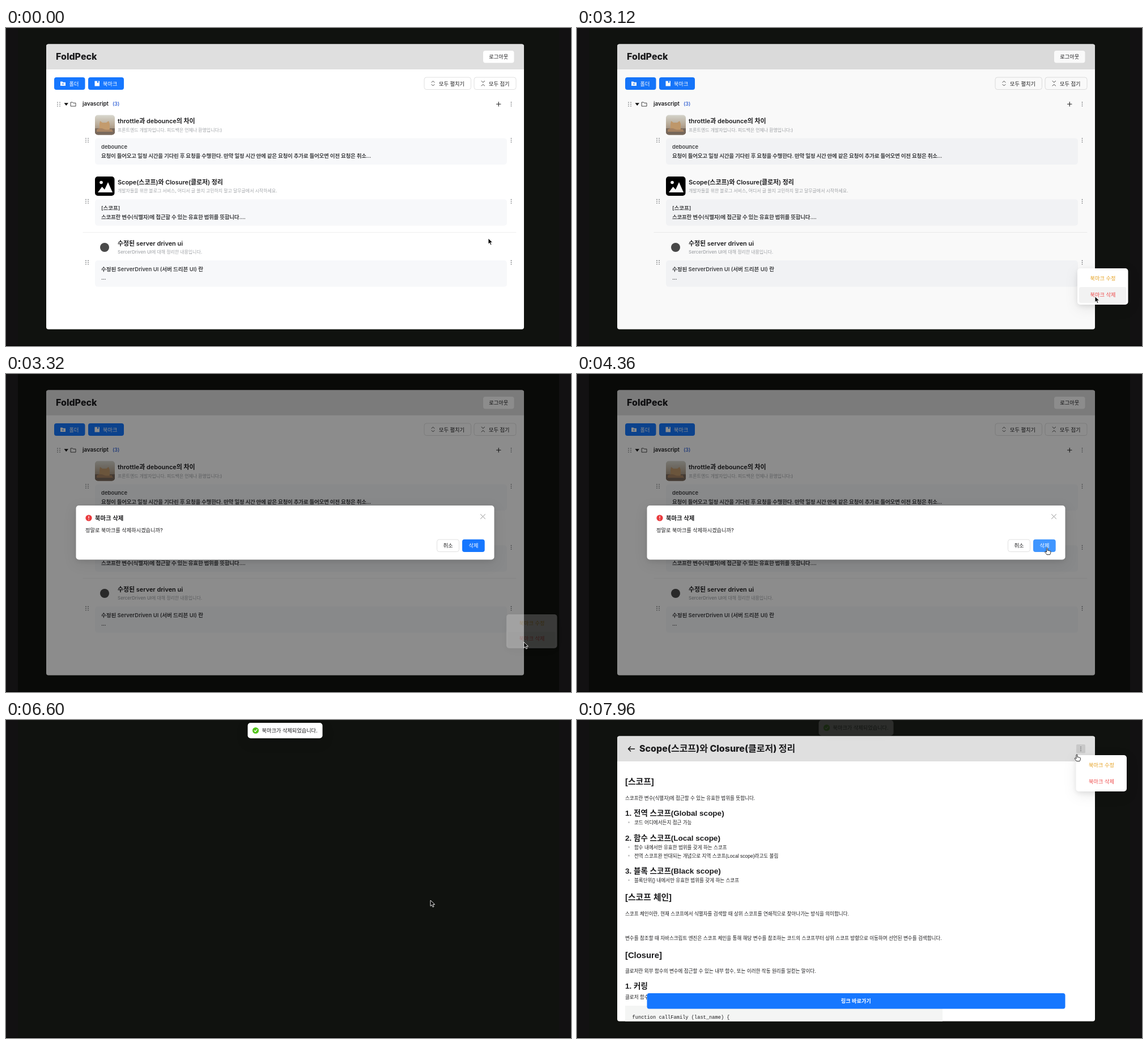
An HTML page for the animation above (8000 ms loop, 997 by 561 pixels).

```html
<!DOCTYPE html>
<html lang="ko">
<head>
<meta charset="utf-8">
<title>Bookmarks</title>
<style>
html, body { margin: 0; width: 100%; height: 100%; overflow: hidden; background: #121112; }
svg { display: block; width: 997px; height: 561px; }
text { font: 400 9.2px Inter, "Noto Sans CJK KR", "Noto Sans CJK", sans-serif; fill: #1c1c1e; white-space: pre; }
.mid { text-anchor: middle; }
.white { fill: #fff; }
.logo { font-size: 16px; font-weight: 800; }
.folder { font-size: 9.7px; font-weight: 600; }
.count { font-size: 8.8px; font-weight: 600; fill: #3a68d8; }
.title { font-size: 10.9px; font-weight: 600; }
.sub { font-size: 7.95px; font-weight: 500; fill: #a3a6aa; }
.note { font-size: 9.5px; font-weight: 600; fill: #3f4043; }
.ko { letter-spacing: -.22px; }
.ask { font-size: 10.4px; font-weight: 600; }
.bold { font-weight: 600; }
.h2, .h3, .p { font-family: "Liberation Sans", "Noto Sans CJK KR", "Noto Sans CJK", sans-serif; }
.h2 { font-size: 14.8px; font-weight: 600; }
.h3 { font-size: 13.5px; font-weight: 600; }
.p { font-size: 8.55px; }
.code { font: 8.7px "Liberation Mono", monospace; }
.edit { fill: #e5a01f; }
.del { fill: #ee4b4b; }
.pop { filter: drop-shadow(0 3px 5px #00000016) drop-shadow(0 6px 11px #00000014); }
</style>
</head>
<body>
<svg id="stage" viewBox="0 0 997 561"></svg>
<script>
const LOOP = 8000;
const rect = (x, y, w, h, fill, r = 0, more = '') =>
  `<rect x="${x}" y="${y}" width="${w}" height="${h}" rx="${r}" fill="${fill}" ${more}/>`;
const text = (x, y, s, cls = '') => `<text x="${x}" y="${y}" class="${cls}">${s}</text>`;
const circle = (x, y, r, fill) => `<circle cx="${x}" cy="${y}" r="${r}" fill="${fill}"/>`;
const line = (d, color = '#222', w = 1) =>
  `<path d="${d}" fill="none" stroke="${color}" stroke-width="${w}" stroke-linecap="round" stroke-linejoin="round"/>`;
const fillPath = (d, fill) => `<path d="${d}" fill="${fill}"/>`;
const group = (id, body, more = '') => `<g id="${id}" ${more}>${body}</g>`;
const dots = (x, y, step = 3.2) => [-step, 0, step].map(d => circle(x, y + d, .8, '#55585c')).join('');
const grip = (x, y) => dots(x - 2, y) + dots(x + 2, y);
const outlined = 'stroke="#d9d9d9" stroke-width=".8"';

const card = rect(71, 28.5, 843, 503, '#fff', 4) +
  fillPath('M71 73V32.5a4 4 0 0 1 4-4H910a4 4 0 0 1 4 4V73z', '#dfdfdf');

const catThumb = rect(157, 153.5, 35, 35, 'url(#photo)', 5) +
  fillPath('M157 177h35v6.500a5 5 0 0 1-5 5h-25a5 5 0 0 1-5-5z', '#79695c') +
  fillPath('M165 181v-12l1-5 4 3h7l4-3 2 5v12q-9 3-18 0z', '#c39b6d') +
  fillPath('M160 179q6-4 12-1t14 0l3 5h-29z', '#a98564');
const pictureThumb = rect(157, 262, 34.5, 34, '#000', 5) +
  circle(168, 272.500, 2.8, '#fff') + fillPath('M162 290l7.500-10 4.500 5 6-13 8 18z', '#fff');

function item(i, thumb, title, sub, first, second) {
  const y = i * 107.8;
  return thumb + text(197, 168.3 + y, title, 'title') + text(197, 182.5 + y, sub, 'sub') +
    rect(157, 194.5 + y, 727, 46.5, '#f7f8fa', 5) +
    text(168, 213.3 + y, first, 'note') + text(168, 228.7 + y, second, 'note ko') +
    grip(143, 198 + y) + dots(891.5, 198 + y);
}

const listPage = card +
  text(88, 56.3, 'FoldPeck', 'logo') +
  rect(842, 40, 54.5, 21.5, '#fff', 4) + text(869.2, 54, '로그아웃', 'mid') +
  rect(85, 87, 54.5, 22, '#1677ff', 4) + text(111.5, 101.5, '폴더', 'white') +
  fillPath('M96 94.500h3.500l1 1.300h4.500v6.200h-9z', '#fff') + line('M100.500 97.300v3M99 98.800h3', '#1677ff', .7) +
  rect(145, 87, 63, 22, '#1677ff', 4) + text(171, 101.5, '북마크', 'white') +
  fillPath('M156.500 93.500h8.500v9h-8.500z', '#fff') + fillPath('M161 93.500h2.200v3.600l-1.100-.8-1.100.8z', '#1677ff') +
  rect(738, 87, 82.500, 21.5, '#fff', 4, outlined) + text(764, 101.5, '모두 펼치기') +
  line('M751 96l2.500-2.500 2.500 2.500M751 99.500l2.500 2.500 2.500-2.500', '#333', .9) +
  rect(826, 87, 74, 21.5, '#fff', 4, outlined) + text(852, 101.5, '모두 접기') +
  line('M839 93.500l2.800 2.500 2.800-2.500M839 102l2.800-2.500 2.800 2.500', '#333', .9) +
  grip(93, 134.5) + fillPath('M102.500 132.300h7.500l-3.750 4.800z', '#111') +
  line('M114.500 131h3l1 1.300h4.500v5.700h-8.500z', '#333', .9) +
  text(135, 137, 'javascript', 'folder') + `<text id="count" x="188" y="137" class="count"></text>` +
  line('M865.500 134.300h7.500M869.250 130.500v7.500', '#222', 1.1) + dots(891.5, 134.3) +
  item(0, catThumb, 'throttle과 debounce의 차이', '프론트엔드 개발자입니다. 피드백은 언제나 환영입니다:)', 'debounce',
    '요청이 들어오고 일정 시간을 기다린 후 요청을 수행한다. 만약 일정 시간 안에 같은 요청이 추가로 들어오면 이전 요청은 취소...') +
  item(1, pictureThumb, 'Scope(스코프)와 Closure(클로저) 정리',
    '개발자들을 위한 블로그 서비스, 어디서 글 쓸지 고민하지 말고 달무글에서 시작하세요.', '[스코프]',
    '스코프란 변수(식별자)에 접근할 수 있는 유효한 범위를 뜻합니다....') +
  group('third', line('M136 360.500H900', '#efefef') + rect(884, 405.5, 15, 16, '#0001', 3, 'id="hover"') +
    item(2, circle(174, 387, 8, '#4a4a4a'), '수정된 server driven ui', 'SercerDriven UI에 대해 정리한 내용입니다.',
      '수정된 ServerDriven UI (서버 드리븐 UI) 란', '...'));

const bullet = (y, s) => circle(91.5, y - 3.8, 1.5, '#c4c4c4') + text(101, y, s, 'p');
const head = (y, s, cls) => text(85, y, s, cls);
const detailPage = card +
  line('M101.500 51H90.500M94.500 47l-4 4 4 4', '#111', 1.5) +
  text(110, 56, 'Scope(스코프)와 Closure(클로저) 정리', 'logo') +
  rect(881, 43, 16, 15.5, '#c9c9c9', 2, 'id="hover2"') + dots(889, 51) +
  head(114, '[스코프]', 'h2') +
  head(141, '스코프란 변수(식별자)에 접근할 수 있는 유효한 범위를 뜻합니다.', 'p') +
  head(169, '1. 전역 스코프(Global scope)', 'h3') + bullet(184.3, '코드 어디에서든지 접근 가능') +
  head(213, '2. 함수 스코프(Local scope)', 'h3') + bullet(228, '함수 내에서만 유효한 범위를 갖게 하는 스코프') +
  bullet(243, '전역 스코프완 반대되는 개념으로 지역 스코프(Local scope)라고도 불림') +
  head(271, '3. 블록 스코프(Black scope)', 'h3') + bullet(286.3, '블록단위{} 내에서만 유효한 범위를 갖게 하는 스코프') +
  head(318, '[스코프 체인]', 'h2') +
  head(345, '스코프 체인이란, 현재 스코프에서 식별자를 검색할 때 상위 스코프를 연쇄적으로 찾아나가는 방식을 의미합니다.', 'p') +
  head(387.5, '변수를 참조할 때 자바스크립트 엔진은 스코프 체인을 통해 해당 변수를 참조하는 코드의 스코프부터 상위 스코프 방향으로 이동하며 선언된 변수를 검색합니다.', 'p') +
  head(419.5, '[Closure]', 'h2') +
  head(446, '클로저란 외부 함수의 변수에 접근할 수 있는 내부 함수, 또는 이러한 작동 원리를 일컫는 말이다.', 'p') +
  head(474, '1. 커링', 'h3') + head(492.3, '클로저 함수', 'p') +
  rect(85, 504, 560, 27.5, '#f4f5f4') + text(97.5, 526.5, 'function callFamily (last_name) {', 'code') +
  rect(123.5, 482, 738, 27.5, '#1677ff', 4) + text(492.3, 498.7, '링크 바로가기', 'mid white bold');

const menu = rect(0, 0, 89.5, 64, '#fff', 5, 'class="pop"') +
  rect(3, 33, 83.5, 28, '#0000000d', 3, 'id="menuHover"') +
  text(45, 20.5, '북마크 수정', 'mid edit') + text(45, 49.5, '북마크 삭제', 'mid del');

const dialog = rect(123.5, 232, 738, 95.5, '#fff', 5, 'class="pop"') +
  circle(146, 254, 5.6, '#e93a3d') + line('M146 251v3.300', '#fff', 1.2) + circle(146, 256.7, .75, '#fff') +
  text(157, 258, '북마크 삭제', 'ask') + text(140, 278.7, '정말로 북마크를 삭제하시겠습니까?') +
  line('M837.500 247.500l8 8M845.500 247.500l-8 8', '#8a8a8a', .9) +
  rect(760.5, 292, 39, 21.5, '#fff', 4, outlined) + text(780, 306, '취소', 'mid') +
  rect(805, 291.7, 39.700, 22.3, '#1677ff', 4, 'id="ok"') + text(825, 306, '삭제', 'mid white');

const toast = rect(426.5, 5, 132, 27.3, '#fff', 5, 'class="pop"') +
  circle(440.5, 18.5, 5.6, '#52c41a') + line('M438 18.600l1.900 1.900 3.200-3.800', '#fff', 1.2) +
  text(451.5, 21.7, '북마크가 삭제되었습니다.');

const arrow = '<path d="M0 0v10.300l2.400-2.200 1.700 3.900 1.900-.8-1.700-3.800h3.400z" fill="#000" stroke="#fff" stroke-width=".9"/>';
const hand = '<path d="M-1 1q1-1.800 2 0v4q1.200-.7 1.900.3 1.200-.5 1.900.5 1.500-.2 1.700 1.200 0 3-1.500 5.200H-.500q-1.500-2.500-3.200-4.200-.3-1.600 1.200-1.400l1.500 1.200z" fill="#fff" stroke="#111" stroke-width=".9"/>';

const stage = document.getElementById('stage');
stage.innerHTML = `<defs><linearGradient id="photo" x2="0" y2="1">
  <stop stop-color="#d9d8cf"/><stop offset=".5" stop-color="#b9ab98"/><stop offset="1" stop-color="#8c7762"/>
  </linearGradient></defs>` +
  rect(0, 0, 997, 561, '#121112') + rect(21, 0, 955, 561, '#10120f') +
  group('list', listPage) + group('detail', detailPage) +
  rect(21, 0, 955, 561, '#000', 0, 'id="mask"') + rect(0, 560, 997, 1, '#000') +
  group('menu', menu) + group('dialog', dialog) + group('toast', toast) +
  group('cursor', group('arrow', arrow) + group('hand', hand));

const $ = {};
stage.querySelectorAll('[id]').forEach(e => $[e.id] = e);

const clamp = v => Math.max(0, Math.min(1, v));
const part = (t, start, len) => clamp((t - start) / len);
const out = (p, n) => 1 - (1 - p) ** n;
const smooth = p => p * p * (3 - 2 * p);
const within = (t, ...spans) => spans.some(([a, b]) => t >= a && t < b);
const show = (e, on) => e.style.display = on ? '' : 'none';
const place = (e, alpha, transform) => {
  show(e, alpha > 0);
  e.setAttribute('opacity', alpha);
  e.setAttribute('transform', transform);
};

// time, x, y of the pointer tip
const path = [
  [0, 851, 371], [720, 851, 371], [1120, 889, 411], [1640, 889, 411], [2240, 875, 470], [2280, 875, 470],
  [3080, 914, 473.5], [3300, 914, 473.5], [3920, 835, 300], [3960, 835, 300], [4340, 829.5, 306.5],
  [5120, 830, 307.5], [5400, 928, 346], [5720, 928, 346], [6240, 749, 318], [7040, 749, 318],
  [7600, 886, 50], [7760, 886, 50], [7940, 882, 60.5], [LOOP, 882, 60.5]
];

function pointer(t) {
  const i = path.findIndex(k => k[0] > t);
  const [t0, x0, y0] = path[i - 1], [t1, x1, y1] = path[i];
  const p = smooth((t - t0) / (t1 - t0));
  return [x0 + (x1 - x0) * p, y0 + (y1 - y0) * p];
}

function drawMenu(t) {
  const second = t > 6000;
  const p = out(part(t, second ? 7660 : 1480, 200), 4);
  const leave = second ? 0 : part(t, 3160, 200);
  const [x, y] = second ? [880.5, 62] : [883, 424];
  place($.menu, p * (1 - leave), `translate(${x} ${y}) scale(1 ${.8 + .2 * p - .2 * leave ** 5})`);
  show($.menuHover, within(t, [2640, 3400]));
}

function drawDialog(t) {
  const p = out(part(t, 3144, 200), 6) * (1 - smooth(part(t, 4700, 200)));
  const s = .2 + .8 * p;
  place($.dialog, p, `translate(912 472) scale(${s}) translate(-912 -472)`);
  $.mask.setAttribute('opacity', .45 * (part(t, 3110, 200) - part(t, 4700, 200)));
  $.ok.setAttribute('fill', t > 3880 ? '#4096ff' : '#1677ff');
}

function drawToast(t) {
  const enter = out(part(t, 4780, 300), 3), leave = out(part(t, 7780, 300), 2.35);
  place($.toast, enter * (1 - leave), `translate(0 ${-32 * (1 - enter) - 5.4 * leave})`);
}

function draw(t) {
  const removed = t >= 4780;
  show($.list, t < 6600);
  show($.detail, t >= 6680);
  show($.third, !removed);
  $.count.textContent = removed ? '(2)' : '(3)';
  show($.hover, within(t, [1060, 1760]));
  show($.hover2, t > 7560);
  drawMenu(t);
  drawDialog(t);
  drawToast(t);

  const [x, y] = pointer(t);
  const pointing = within(t, [1060, 1760], [3880, 5260], [5860, 6600], [7560, LOOP]);
  $.cursor.setAttribute('transform', `translate(${x} ${y})`);
  show($.hand, pointing);
  show($.arrow, !pointing);
}

const start = performance.now();
function tick() {
  draw((performance.now() - start) % LOOP);
  requestAnimationFrame(tick);
}
tick();
</script>
</body>
</html>
```
